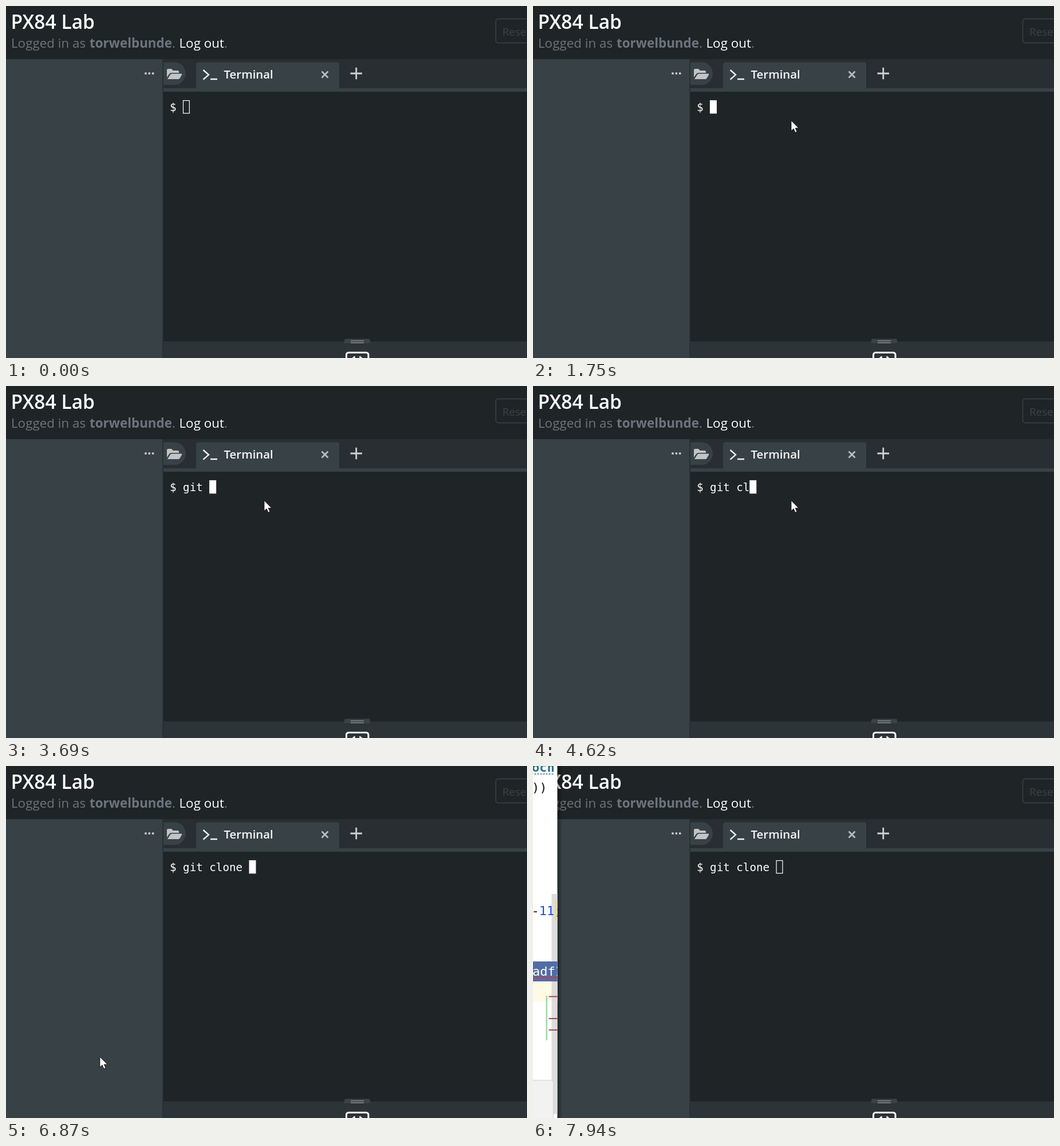
Recreate the animation shown at these times as an HTML page. Size 910 by 616 pixels, loop 8000 ms.

```html
<!DOCTYPE html>
<html lang="en">
<head>
<meta charset="utf-8">
<title>Terminal session</title>
<style>
  html, body { margin: 0; width: 100%; height: 100%; overflow: hidden; background: #1f2426; }
  svg { display: block; width: 910px; height: 616px; }
  text { white-space: pre; }
  .ui { font-family: "Open Sans", "Noto Sans", sans-serif; }
  .mono { font-family: "DejaVu Sans Mono", "Noto Sans Mono", monospace; }
  .sub { font-size: 22.4px; fill: #6c757d; }
  .code { font-size: 22px; fill: #111; }
</style>
</head>
<body>
<svg viewBox="0 0 910 616" xmlns="http://www.w3.org/2000/svg">
  <defs>
    <linearGradient id="shade">
      <stop offset="0" stop-color="#000" stop-opacity=".4"/>
      <stop offset="1" stop-color="#000" stop-opacity="0"/>
    </linearGradient>
    <clipPath id="edge"><rect x="-60" width="60" height="616"/></clipPath>
  </defs>

  <!-- header -->
  <rect width="910" height="616" fill="#1f2426"/>
  <g class="ui">
    <text x="8.5" y="40" font-size="33.6" font-weight="600" fill="#fff">PX84 Lab</text>
    <g class="sub">
      <text x="9" y="73">Logged in as</text>
      <text x="146" y="73"><tspan font-weight="700">torwelbunde</tspan>.</text>
      <text x="302.500" y="73"><tspan fill="#fff">Log out</tspan>.</text>
    </g>
    <rect x="855.5" y="22.5" width="90" height="42" rx="4" fill="none" stroke="#3b4246" stroke-width="1.5"/>
    <text x="867" y="51.5" font-size="18.8" fill="#3b4347">Reset</text>
  </g>

  <!-- side panel and tab bar -->
  <rect y="93" width="274" height="523" fill="#374146"/>
  <rect x="275" y="93" width="635" height="51" fill="#282e31"/>
  <rect x="275" y="144" width="635" height="6" fill="#374146"/>
  <rect x="273" y="93" width="2" height="523" fill="#2a3134"/>
  <g fill="#c8ccce">
    <circle cx="244" cy="118" r="2"/><circle cx="250.3" cy="118" r="2"/><circle cx="256.7" cy="118" r="2"/>
  </g>
  <path d="M275 98.500H297A20 20 0 0 1 297 138H275Z" fill="#374146"/>
  <path d="M281 125V112Q281 110 283 110H289L292 113H300Q302 113 302 115V117H289Q286.500 117 285 119Z
           M282 128L287 120Q288 118.500 290 118.500H306Q308 118.500 307 120.500L303.500 126.500Q302.500 128 301 128Z" fill="#c1c5c6"/>
  <path d="M332 144V102Q332 98.500 335.500 98.500H578.500Q582 98.500 582 102V144Z" fill="#374146"/>
  <g fill="none" stroke="#f4f5f5" stroke-width="2.4">
    <path d="M344.500 112L354 120.300L344.500 128.600M357 128H369"/>
    <path d="M551.500 114.500L562.500 125.500M562.500 114.500L551.500 125.500" stroke="#b9bdbf" stroke-width="2.800"/>
    <path d="M601.500 118H622M611.750 107.800V128.200" stroke="#cdd0d1" stroke-width="2.800"/>
  </g>
  <text class="ui" x="380.500" y="127" font-size="20.400" font-weight="600" fill="#f6f7f7">Terminal</text>

  <!-- bottom panel -->
  <rect x="275" y="587" width="635" height="29" fill="#2d3437"/>
  <path d="M591 590V585Q591 582.500 593.500 582.500H633.500Q636 582.500 636 585V590Z" fill="#3a4347"/>
  <path d="M602 586H625M602 589.500H625" stroke="#a9aeb0" stroke-width="1.200"/>
  <rect x="594.500" y="606.500" width="38.500" height="30" rx="4" fill="none" stroke="#fff" stroke-width="3"/>
  <path d="M605.500 617L609.500 613.500M617.500 613.500L621.500 617" stroke="#fff" stroke-width="2.800"/>

  <!-- terminal -->
  <text id="line" class="mono" x="286" y="184" font-size="19.200" fill="#fff"></text>
  <rect id="caret" y="165.500" width="10.800" height="22.200" stroke="#fff" stroke-width="1.200"/>

  <!-- editor window; its right edge sits at x = 0 -->
  <g id="editor">
    <rect width="9" height="616" fill="url(#shade)"/>
    <rect x="-60" width="60" height="616" fill="#fff"/>
    <rect x="-60" y="378" width="60" height="34" fill="#fffae3"/>
    <rect x="-10" y="224" width="10" height="385" fill="#d8d8d8" fill-opacity=".85"/>
    <rect x="-5" y="235" width="5" height="35" fill="#e8d5b0"/>
    <rect x="-60" y="342" width="60" height="35" fill="#526da5"/>
    <rect x="-70" y="550" width="63" height="80" rx="3" fill="#f2f2f2" stroke="#cfcfcf"/>
    <g class="mono code" clip-path="url(#edge)">
      <text x="-44.600" y="10" font-weight="700" style="fill:#287285">och</text>
      <path d="M-45 14H-5" stroke="#287285" stroke-width="1.500" stroke-dasharray="3 2"/>
      <text x="-44.600" y="45">))</text>
      <text x="-45" y="261">-<tspan fill="#1750eb">11</tspan>;</text>
      <text x="-43.500" y="367" style="fill:#fff">adf1</text>
      <path id="wave" fill="none" stroke="#d0393e" stroke-width="1.200"/>
    </g>
    <path d="M-18.700 402V480" stroke="#a3d3a3" stroke-width="2.400"/>
    <path d="M-15 403.500H0M-15 442H0M-15 462H0" stroke="#a34a48" stroke-width="2"/>
  </g>

  <path id="mouse" d="M0 0V18L4.200 14.300L7 20.800L10 19.500L7.200 13.200H13Z"
        fill="#fff" stroke="#111" stroke-width=".8"/>
</svg>
<script>
const LOOP = 8000, CELL = 11.56, LEFT = 286.4;
const $ = id => document.getElementById(id);
const line = $('line'), caret = $('caret'), editor = $('editor'), mouse = $('mouse');

const COMMAND = 'git clone ';
const KEYS = [3150, 3290, 3470, 3690, 4480, 4620, 4790, 5020, 5160, 5240];

// [time, state]
const CARET = [
  [0, 'hollow'], [1600, 'solid'], [2220, 'off'], [2850, 'solid'], [4310, 'off'], [4480, 'solid'],
  [5860, 'off'], [6480, 'solid'], [7100, 'off'], [7630, 'hollow']
];

// [time, x, y]; the pointer glides in from below, slowing down
const POINTER = [[0, -50, 700]];
for (let k = 0; k < 9; k++) {
  const s = 1 - (1 - k / 8) ** 1.8;
  POINTER.push([290 + 76.25 * k, 733 - 250.5 * s, 604 - 356 * s]);
}
POINTER.push(
  [1210, 478.5, 244], [1280, 468, 226], [1360, 456, 208], [1430, 451, 200.5],
  [6560, 170, 394], [6790, 168, 440], [6870, 164, 509], [6940, 156, 556],
  [7020, 146, 586], [7090, 138, 608], [7170, -50, 700]
);

// [time, right edge]
const EDGE = [[0, -20], [7880, 16], [7940, 42.5]];

const at = (table, t) => table.findLast(row => row[0] <= t);

let wave = 'M-44 371';
for (let x = -42, up = true; x <= 0; x += 2, up = !up) wave += `L${x} ${up ? 369 : 372}`;
$('wave').setAttribute('d', wave);

function draw(t) {
  const typed = KEYS.filter(k => k <= t).length;
  line.textContent = '$ ' + COMMAND.slice(0, typed);

  const state = at(CARET, t)[1];
  caret.setAttribute('x', LEFT + CELL * (2 + typed));
  caret.setAttribute('fill', state === 'solid' ? '#fff' : 'none');
  caret.setAttribute('visibility', state === 'off' ? 'hidden' : 'visible');

  const [, x, y] = at(POINTER, t);
  mouse.setAttribute('transform', `translate(${x} ${y})`);
  editor.setAttribute('transform', `translate(${at(EDGE, t)[1]} 0)`);
}

const start = performance.now();
function tick() {
  draw((performance.now() - start) % LOOP);
  requestAnimationFrame(tick);
}
tick();
</script>
</body>
</html>
```
